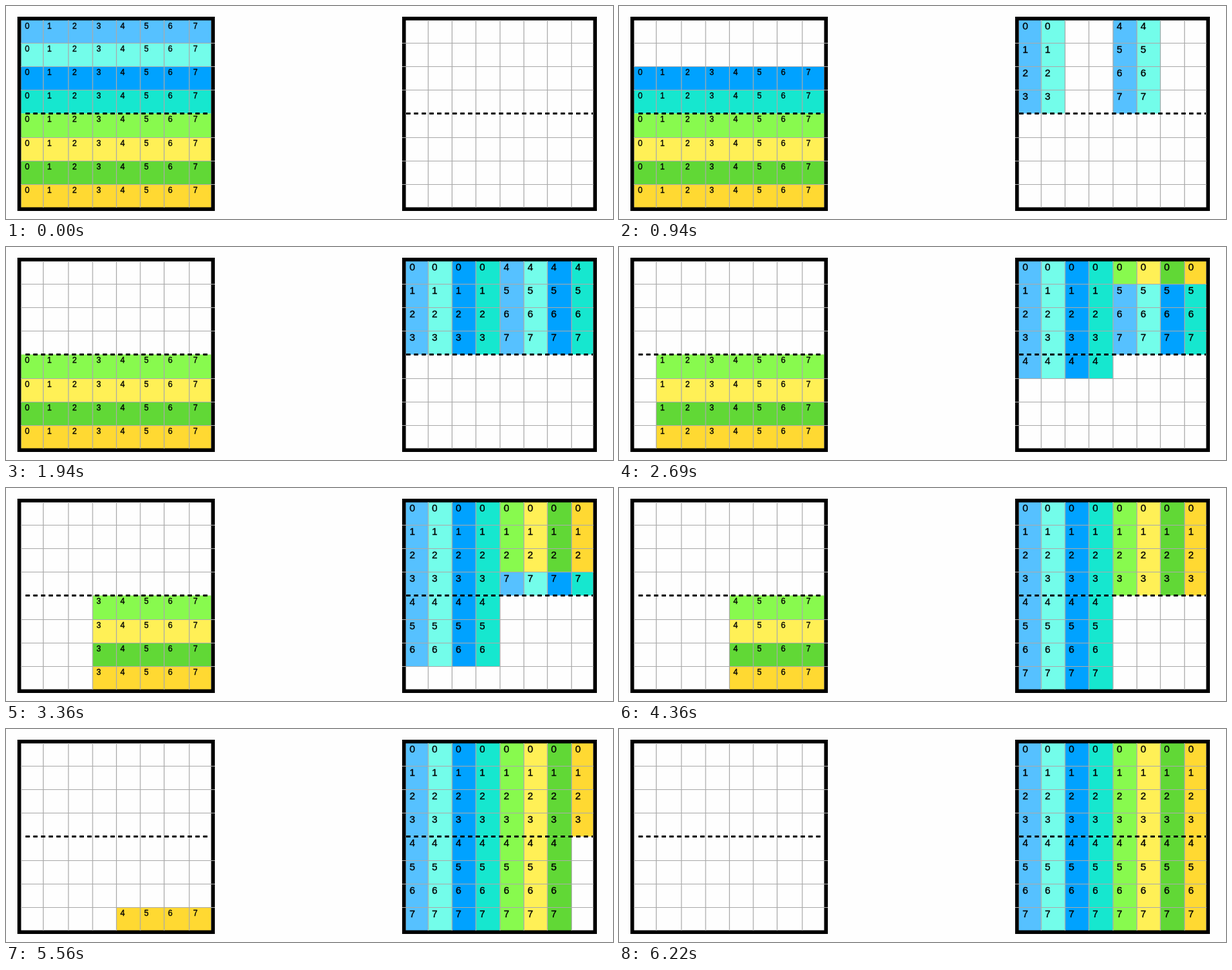
These frames come from a looping animation (904x318 px, 6360 ms). An HTML page:

```html
<!DOCTYPE html>
<html lang="en">
<head>
<meta charset="utf-8">
<title>Blocked 8×8 transpose</title>
<style>
  html, body { margin: 0; height: 100%; overflow: hidden; background: #fefefe; }
  svg { display: block; width: 904px; height: 318px; }
  text {
    font-family: "Liberation Sans", Arial, sans-serif; text-anchor: middle;
    fill: #000; stroke: #000; stroke-width: .35;
  }
  .grid { stroke: #aaa; stroke-width: 1.2; fill: none; }
  .frame { stroke: #000; stroke-width: 5.5; fill: none; }
  .split { stroke: #000; stroke-width: 2.8; stroke-dasharray: 6.5 5; }
</style>
</head>
<body>
<svg id="stage" viewBox="0 0 904 318"></svg>
<script>
const LOOP = 6360, FIRST_STEP = 150, STEP = 530, STEPS = 12;
const COLORS = ['#56c1ff', '#73fdea', '#00a2ff', '#16e7cf', '#88fa4e', '#fff056', '#61d836', '#ffd932'];
const ROWS = [21, 55.5, 90.5, 125.5, 160.5, 196.5, 231.5, 266.5, 301];
const INDEXES = [0, 1, 2, 3, 4, 5, 6, 7];

const LEFT = {
  cols: [22.5, 55.5, 93, 129, 164.5, 200, 235.5, 273, 305.5],
  lines: [22, 311], dash: [29, 304], font: 12, dx: 9, baseline: 12.6, cell: sourceCell
};
const RIGHT = {
  cols: [595.5, 628.8, 664.3, 699.8, 735.8, 771.3, 806.3, 842.3, 874.5],
  lines: [590, 875], dash: [596, 874], font: 14.8, dx: 9.5, baseline: 14.4, cell: targetCell
};

// Each cell is [row it came from, number], or null when empty.
function sourceCell(r, c, step) {
  const leavesAfter = r < 4 ? r : c < 4 ? c + 4 : r + 4;
  return step <= leavesAfter ? [r, c] : null;
}

function targetCell(r, c, step) {
  const arrivesAfter = c < 4 ? (r < 4 ? c : r) : (r < 4 ? r + 4 : c + 4);
  if (step > arrivesAfter) return [c, r];
  // The upper right quarter holds numbers 4 to 7 for a while.
  return r < 4 && c >= 4 && step > c - 4 ? [c - 4, r + 4] : null;
}

function drawMatrix({ cols, lines, dash, font, dx, baseline, cell }, step) {
  let fills = '', labels = '', grid = '';
  for (const r of INDEXES) for (const c of INDEXES) {
    const content = cell(r, c, step);
    if (!content) continue;
    const [color, number] = content, x = cols[c], y = ROWS[r];
    fills += `<rect x="${x}" y="${y}" width="${cols[c + 1] - x}" height="${ROWS[r + 1] - y}" fill="${COLORS[color]}"/>`;
    labels += `<text x="${x + dx}" y="${y + baseline}" font-size="${font}">${number}</text>`;
  }
  for (const i of INDEXES.slice(1)) {
    grid += `M${cols[i]} 21V301`;
    if (i !== 4) grid += `M${lines[0]} ${ROWS[i]}H${lines[1]}`;
  }
  const width = cols[8] - cols[0] + 5.5;
  return `${fills}<rect class="frame" x="${cols[0] - 2.75}" y="18.75" width="${width}" height="284.5"/>
    <path class="grid" d="${grid}"/>
    <path class="split" d="M${dash[0]} 160.5H${dash[1]}"/>${labels}`;
}

const stage = document.getElementById('stage');
let shown = -1;

function tick() {
  const t = performance.now() % LOOP;
  const step = Math.min(STEPS, Math.max(0, Math.floor((t - FIRST_STEP) / STEP) + 1));
  if (step !== shown) {
    shown = step;
    stage.innerHTML = drawMatrix(LEFT, step) + drawMatrix(RIGHT, step);
  }
  requestAnimationFrame(tick);
}
tick();
</script>
</body>
</html>
```
